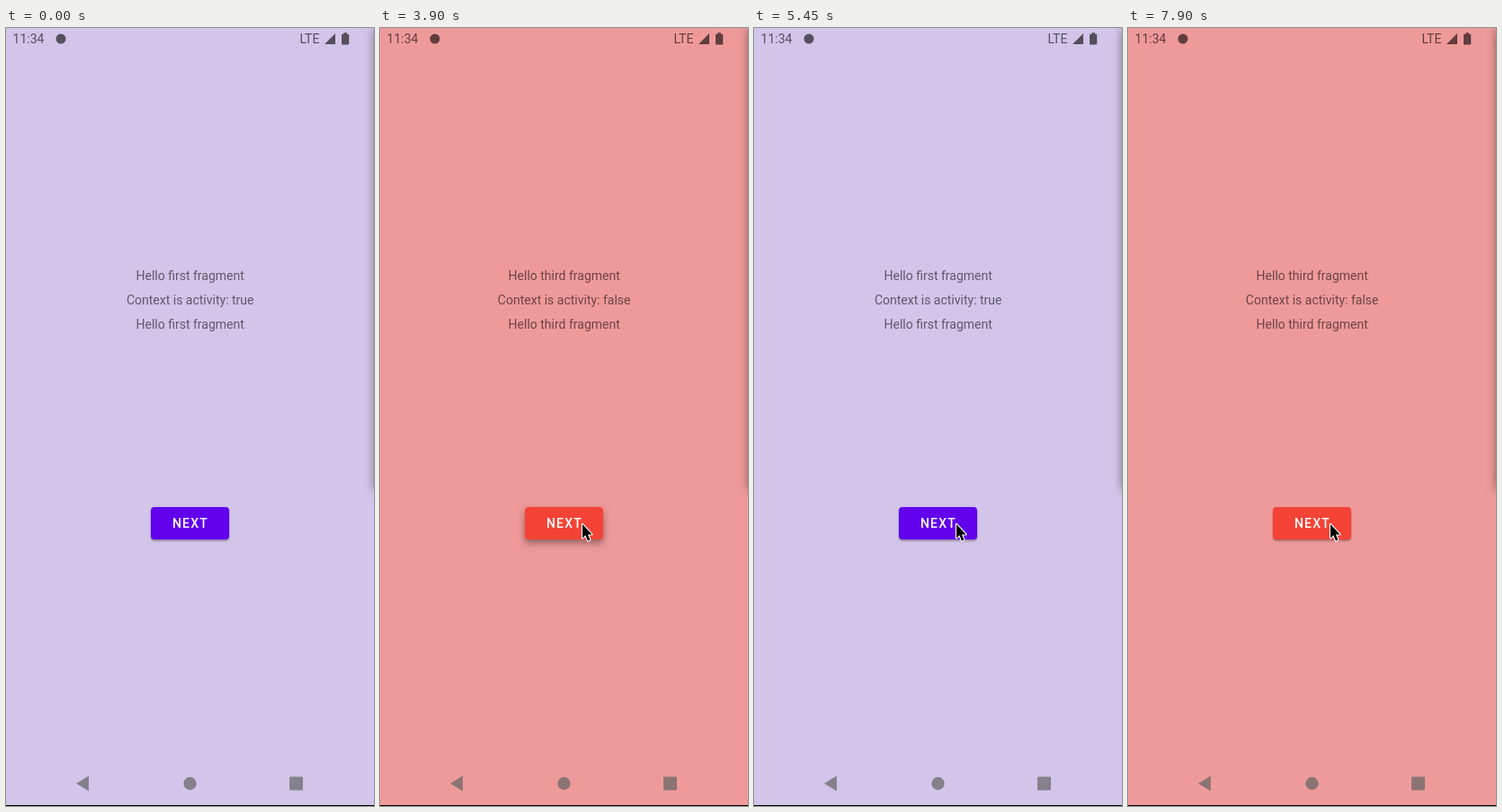
An HTML page that plays this animation: 409 by 864 pixels, repeating every 8000 ms.

```html
<!DOCTYPE html>
<html lang="en">
<head>
<meta charset="utf-8">
<title>Fragments</title>
<style>
  html, body { margin: 0; width: 100%; height: 100%; overflow: hidden; }
  svg { display: block; width: 409px; height: 864px; }
  text { font: 400 14px Roboto, "Noto Sans CJK SC", sans-serif; }
  .mid { text-anchor: middle; }
  .body text { fill: #000; fill-opacity: .55; }
  .label { font-weight: 500; letter-spacing: 1.25px; fill: #fff; }
  .ar { font-family: "DejaVu Sans", sans-serif; font-size: 12.4px; font-weight: 400; letter-spacing: 0; }
  .label.ar { font-size: 11.5px; }
  .status { fill: #000; fill-opacity: .6; }
  .nav { fill: #646464; fill-opacity: .7; }
</style>
</head>
<body>
<svg viewBox="0 0 409 864">
  <defs>
    <filter id="edgeBlur" filterUnits="userSpaceOnUse" x="360" y="-60" width="120" height="640">
      <feGaussianBlur stdDeviation="6"/>
    </filter>
    <filter id="btnBlur" filterUnits="userSpaceOnUse" x="130" y="505" width="150" height="100">
      <feGaussianBlur id="blur" stdDeviation="1.2"/>
    </filter>
    <radialGradient id="glow">
      <stop offset="0" stop-color="#fff" stop-opacity=".27"/>
      <stop offset=".65" stop-color="#fff" stop-opacity=".22"/>
      <stop offset="1" stop-color="#fff" stop-opacity="0"/>
    </radialGradient>
    <clipPath id="btnClip"><rect x="161" y="532" width="87" height="36" rx="4"/></clipPath>
  </defs>

  <rect id="bg" width="409" height="864"/>
  <rect x="410" y="2" width="50" height="511" fill-opacity=".5" filter="url(#edgeBlur)"/>

  <g class="status">
    <text x="7.6" y="17">11:34</text>
    <circle cx="61" cy="12" r="5.5"/>
    <text x="326.4" y="17">LTE</text>
    <path d="M354 18H366V6Z"/>
    <path d="M375.3 5.3h3.6v1.4h1.4q.9 0 .9 .9v10q0 .9-.9 .9h-6.4q-.9 0-.9-.9v-10q0-.9 .9-.9h1.4Z"/>
  </g>

  <g class="body mid">
    <text id="top" x="204.7"/>
    <text id="context" x="204.7" y="307"/>
    <text id="bottom" x="204.7"/>
  </g>

  <rect id="shade" x="161" y="532" width="87" height="36" rx="4" filter="url(#btnBlur)"/>
  <rect id="btn" x="161" y="532" width="87" height="36" rx="4"/>
  <text id="label" x="205"/>
  <g clip-path="url(#btnClip)"><circle id="ripple" cx="222" cy="550" fill="url(#glow)"/></g>

  <g class="nav">
    <path d="M78 839L92 830.5V847.5Z"/>
    <circle cx="204.5" cy="839" r="7.2"/>
    <rect x="315" y="831.5" width="15" height="15" rx="1"/>
  </g>
  <rect y="863" width="409" height="1"/>

  <path id="cursor" d="M1 2V17.5L4.4 14.3L7 20.6L9.5 19.5L6.9 13.4H11.6Z"
        fill="#000" stroke="#fff" stroke-width="2.2" stroke-linejoin="round" paint-order="stroke"/>
</svg>
<script>
const $ = id => document.getElementById(id);
const LOOP = 8000, STEP = 50;

const purple = { bg: '#d2c5e9', btn: '#6200ee', text: 'Hello first fragment', label: 'NEXT', activity: true };
const green = { bg: '#a5d6a8', btn: '#4caf50', text: 'مرحبا الجزء الثاني', label: 'التالي', arabic: true, reach: 31 };
const red = { bg: '#ef9a9a', btn: '#f44336', text: 'Hello third fragment', label: 'NEXT' };
const yellow = { bg: '#fff29e', btn: '#ffc107', text: '你好第四个片段', label: '第一的' };

// page, time of press, time of the switch to the next page
const timeline = [
  [purple, 1200, 1350],
  [green, 2500, 2650],
  [red, 3900, 4050],
  [yellow, 5350, 5450],
  [purple, 6850, 6900],
  [green, 7750, 7900],
  [red, LOOP, LOOP]
];

const set = (id, attrs) => {
  for (const k in attrs) $(id).setAttribute(k, attrs[k]);
};
const mix = (a, b, p) => a + (b - a) * p;
const clamp = p => Math.max(0, Math.min(1, p));

let shown;
function showPage(page) {
  if (page === shown) return;
  shown = page;
  const ar = page.arabic;
  set('bg', { fill: page.bg });
  set('btn', { fill: page.btn });
  $('top').textContent = $('bottom').textContent = page.text;
  $('context').textContent = 'Context is activity: ' + Boolean(page.activity);
  $('label').textContent = page.label;
  set('top', { y: ar ? 278 : 280, class: ar ? 'ar' : '' });
  set('bottom', { y: ar ? 331.5 : 333.5, class: ar ? 'ar' : '' });
  set('label', { y: ar ? 553.5 : 555.3, class: 'mid label' + (ar ? ' ar' : '') });
}

function showPress(page, age) {
  const lift = age < 0 ? 0 : 1;
  set('shade', { transform: `translate(0 ${mix(1.5, 4, lift)})`, 'fill-opacity': mix(.36, .38, lift) });
  set('blur', { stdDeviation: mix(1.2, 4, lift) });
  set('ripple', { r: age < STEP ? 0 : (page.reach || 38) * mix(.4, 1, clamp(age / 50 - 1)) });
}

// sweeps in from the left, overshoots the button a little and settles
function moveCursor(t) {
  const a = clamp((t - 200) / 230), b = clamp((t - 430) / 120);
  const ease = a * a * (3 - 2 * a), back = b * (2 - b);
  const x = mix(30, 240, ease) - 16 * back;
  const y = mix(455, 544, ease) + 5 * back;
  set('cursor', { transform: `translate(${x} ${y})`, visibility: t < 200 ? 'hidden' : 'visible' });
}

function draw(time) {
  const t = Math.floor(time % LOOP / STEP) * STEP;
  const [page, press] = timeline.find(part => t < part[2]);
  showPage(page);
  showPress(page, t - press);
  moveCursor(t);
}

const start = performance.now();
function tick() {
  draw(performance.now() - start);
  requestAnimationFrame(tick);
}
tick();
</script>
</body>
</html>
```
